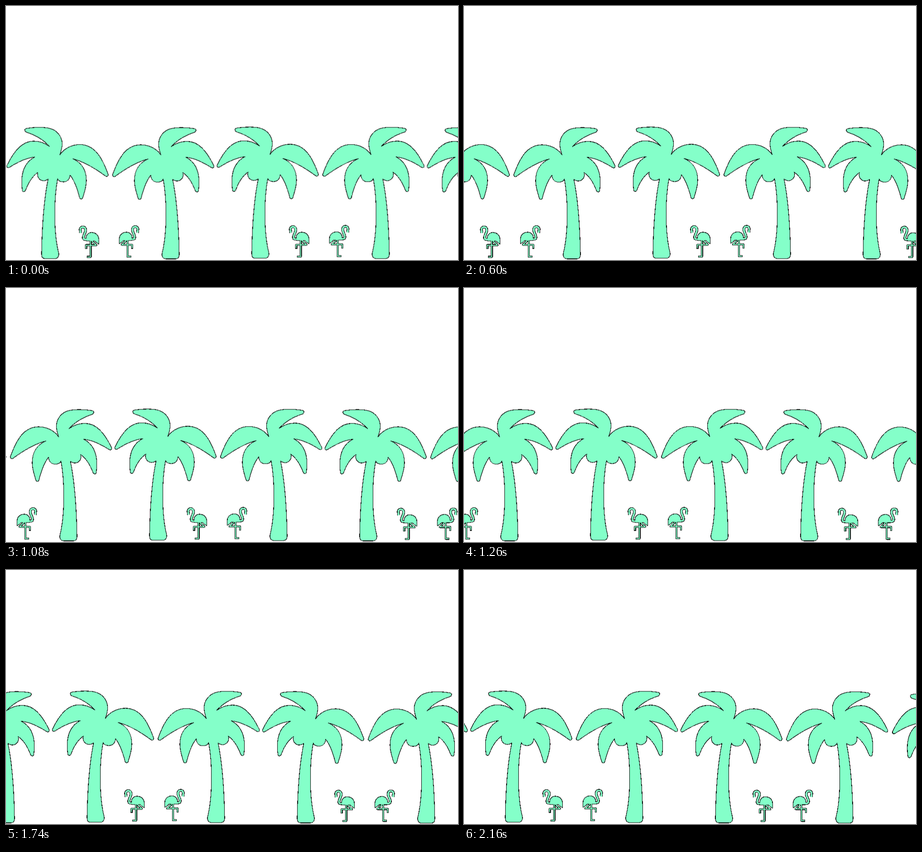
Recreate the animation shown at these times as an HTML page. Size 998 by 561 pixels, loop 2220 ms.

```html
<!DOCTYPE html>
<html lang="en">
<head>
<meta charset="utf-8">
<title>Palms and flamingos</title>
<style>
  html, body { margin: 0; width: 100%; height: 100%; overflow: hidden; background: #fff; }
  svg { display: block; width: 100vw; height: 100vh; shape-rendering: crispEdges; }
  .palm { fill: #84ffc9; stroke: #000; stroke-width: 1.25; stroke-linejoin: round; }
  .bird { fill: none; stroke-linejoin: round; }
  .edge { stroke: #000; --rim: 2.4px; }
  .core { stroke: #84ffc9; --rim: 0px; }
  .neck { stroke-width: calc(3.6px + var(--rim)); }
  .legs { stroke-width: calc(2px + var(--rim)); stroke-linecap: square; }
  .body { stroke-width: var(--rim); fill: #84ffc9; }
  #row { animation: slide 2220ms steps(37) infinite; }
  @keyframes slide { to { transform: translateX(-464px); } }
</style>
</head>
<body>
<svg viewBox="0 0 998 561" preserveAspectRatio="none">
  <defs>
    <path id="palm" class="palm" d="
      M41 273 C41 270 44 270 47 269.5 C62 267 84 266.5 97 270
      C111.5 274 123.5 287 123.5 304 C123.5 314 121 321 118.5 328
      C127 315 144 305.5 163 305.5 C196 306 212 335 225 371
      C226 375 222 377.5 219 375 C200 361 174 344 147 337
      C168 346 177 364 177 385 C177 400 172 412 169 423
      C168 427 163 427 162 423 C158 407 152 387 141 373
      C140 383 134 388 126 388 C120 388 115 386 113.5 381
      C105 428 104.5 500 116 546 C117 553 113 557.5 107 557.5
      L86 557.5 C80 557.5 78 554 78 548 C79 490 82.5 430 92.5 382
      C88 385 84 386 81 385.5 C72 384 67 375 70 367
      C57 376 49 390 43 406 C41 411 36 411 35.5 406
      C31 372 38 346 63 333 C45 335 24 345 7 356
      C3 358 0 355 2 351 C18 318 36 298 61 298
      C74 298 85 302 95.5 309.5 C82 295 63 284 44 278
      C42 277 41 276 41 273 Z"/>
    <g id="parts">
      <path class="neck" d="M164.3 501 L163.5 495 C162.7 490.5 165.5 487.7 169 487.7 C174 487.7 176 492 174.9 497
        C173.7 502 170.3 507 170.3 511 C170.3 515 173 515.4 179 515.2"/>
      <path class="legs" d="M186.3 517 V553.5 H180 M189 518 L199 527.5 H176.3 V534"/>
      <path class="body" d="M176.5 512 C177 505 182 500.3 188.5 500.3 C198 500.3 203.5 507 203.7 514
        L204 524.5 L195 517.5 H177 Z"/>
    </g>
    <g id="bird" class="bird">
      <use href="#parts" class="edge"/>
      <use href="#parts" class="core"/>
    </g>
    <g id="tile">
      <use href="#palm"/>
      <use href="#palm" transform="translate(460 .5) scale(-1 1)"/>
      <use href="#bird"/>
      <use href="#bird" transform="translate(454 -.7) scale(-1 1)"/>
    </g>
  </defs>
  <g transform="translate(.5 .5)">
    <g id="row">
      <use href="#tile"/>
      <use href="#tile" x="464" y="-.7"/>
      <use href="#tile" x="928" y=".5"/>
      <use href="#tile" x="1395.5" y="4.5"/>
    </g>
  </g>
</svg>
</body>
</html>
```
